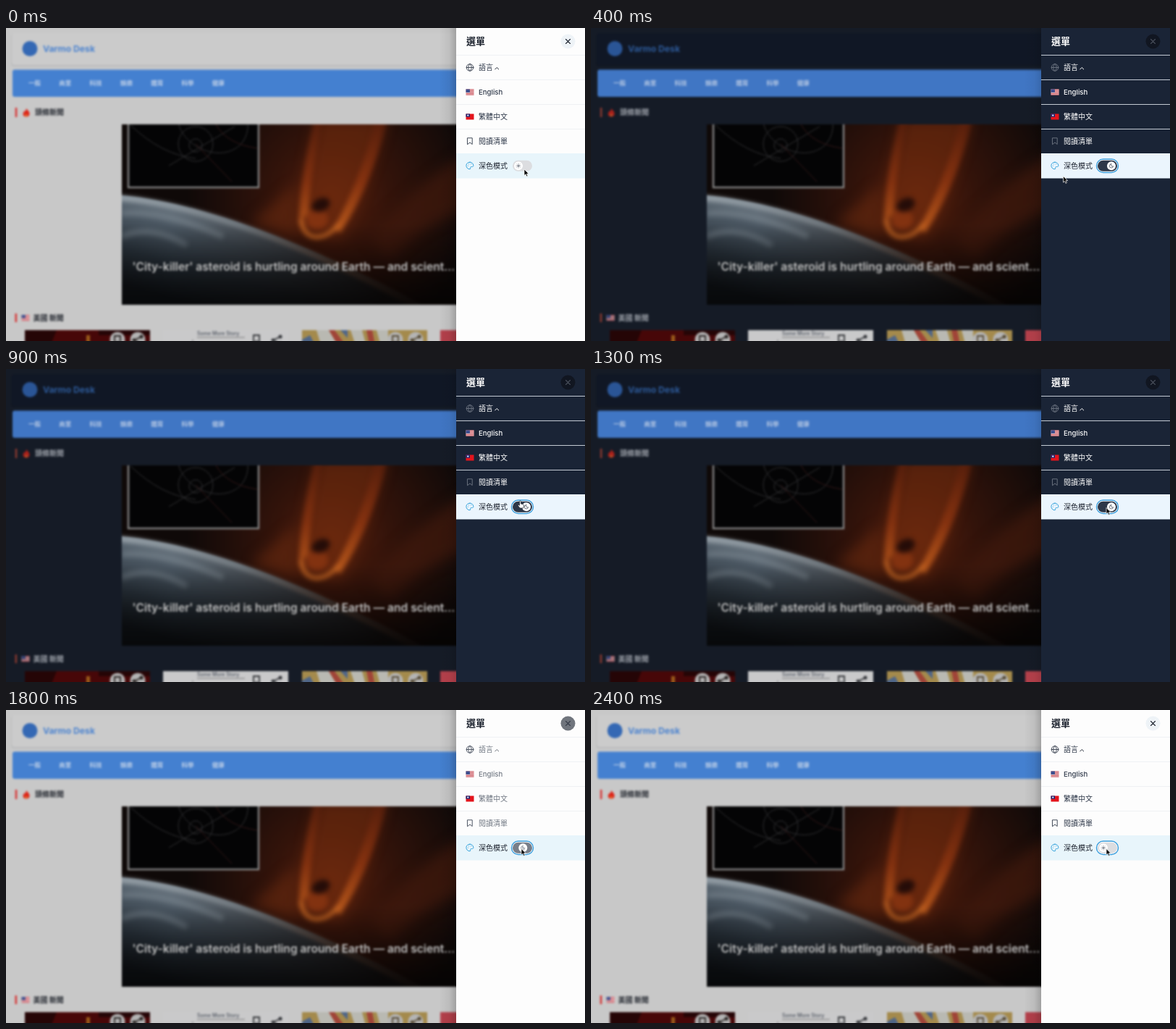
An HTML page that plays this animation: 800x432 px, repeating every 2.5 s.

```html
<!DOCTYPE html>
<html lang="zh-Hant">
<head>
<meta charset="utf-8">
<title>選單</title>
<style>
html, body { margin: 0; width: 100%; height: 100%; overflow: hidden; }
svg { display: block; width: 800px; height: 432px; }
filter { color-interpolation-filters: sRGB; }
text { font-family: Inter, "Noto Sans CJK TC", "Noto Sans CJK", "Noto Sans CJK JP", sans-serif; }
#stage {
  --body: #c8c8c8; --header: #cbcbcb; --edge: #babbbd; --nav: #4480d0; --brand: #4a82cf;
  --logo: #3468b4; --head: #22262e; --bar: #d62c2c; --navtext: #c3d2e8; --emoji: 1;
  --panel: #fdfdfd; --title: #1a202c; --line: #eff1f4; --hover: #e8f5fb; --shade: .2;
}
#stage.dark {
  --body: #151b26; --header: #101725; --edge: #111722; --nav: #4076c4; --brand: #2d5a99;
  --logo: #2a5596; --head: #a0a5ad; --bar: #8f3a30; --navtext: #b9cae4; --emoji: .75;
  --panel: #1a2436; --title: #fff; --line: #c3cad3; --hover: #ebf5fd; --shade: .12;
}
.body { fill: var(--body); }
.header { fill: var(--header); }
.edge { fill: var(--edge); }
.nav { fill: var(--nav); }
.logo { fill: var(--logo); }
.brand { fill: var(--brand); font-size: 12.2px; font-weight: 700; }
.navtext { fill: var(--navtext); font-size: 8.5px; font-weight: 700; }
.head { fill: var(--head); font-size: 10px; font-weight: 700; }
.bar { fill: var(--bar); }
.emoji { opacity: var(--emoji); }
.panel { fill: var(--panel); }
.title { fill: var(--title); font-size: 13px; font-weight: 700; }
.lines { stroke: var(--line); }
.hover { fill: var(--hover); }
.item { font-size: 10px; font-weight: 500; }
.line-icon { fill: none; stroke-width: 1; stroke-linecap: round; stroke-linejoin: round; }
</style>
</head>
<body>
<svg id="stage" viewBox="0 0 800 432">
  <defs>
    <filter id="soft" x="0" y="0" width="800" height="432" filterUnits="userSpaceOnUse"><feGaussianBlur stdDeviation="1.5"/></filter>
    <filter id="glow" x="-40%" y="-40%" width="180%" height="180%"><feGaussianBlur stdDeviation="9"/></filter>
    <filter id="haze" x="-30%" y="-30%" width="160%" height="160%"><feGaussianBlur stdDeviation="3"/></filter>
    <clipPath id="heroClip"><path d="M160 133H640V382H160Z"/></clipPath>
    <radialGradient id="sky" gradientUnits="userSpaceOnUse" cx="450" cy="235" r="200">
      <stop offset="0" stop-color="#541f0d"/><stop offset=".4" stop-color="#33130a"/><stop offset="1" stop-color="#0f0908"/>
    </radialGradient>
    <linearGradient id="flame" gradientUnits="userSpaceOnUse" x1="0" y1="133" x2="0" y2="290">
      <stop offset="0" stop-color="#5a200c"/><stop offset=".5" stop-color="#8a3410"/><stop offset="1" stop-color="#c8641f"/>
    </linearGradient>
    <linearGradient id="earth" gradientUnits="userSpaceOnUse" x1="235" y1="236" x2="200" y2="365">
      <stop offset="0" stop-color="#76828c"/><stop offset=".3" stop-color="#4a5661"/>
      <stop offset=".65" stop-color="#28313a"/><stop offset="1" stop-color="#14181d"/>
    </linearGradient>
    <linearGradient id="night" gradientUnits="userSpaceOnUse" x1="230" y1="0" x2="520" y2="0">
      <stop offset="0" stop-color="#120d0c" stop-opacity="0"/><stop offset="1" stop-color="#120d0c" stop-opacity=".92"/>
    </linearGradient>
    <linearGradient id="limb" gradientUnits="userSpaceOnUse" x1="160" y1="0" x2="580" y2="0">
      <stop offset="0" stop-color="#b4bdc3"/><stop offset=".4" stop-color="#858c91"/>
      <stop offset=".7" stop-color="#6b4a38"/><stop offset="1" stop-color="#1e100c"/>
    </linearGradient>
    <linearGradient id="fade" x2="0" y2="1">
      <stop offset="0" stop-opacity="0"/><stop offset="1" stop-opacity=".65"/>
    </linearGradient>
    <linearGradient id="shade">
      <stop offset="0" stop-opacity="0"/><stop offset=".6" stop-opacity=".3"/><stop offset="1"/>
    </linearGradient>
    <g id="us">
      <path fill="#e9e6e8" d="M0 0H11V8H0Z"/>
      <path stroke="#cf3a44" stroke-width=".9" d="M0 .5H11M0 2.3H11M0 4.1H11M0 5.9H11M0 7.6H11"/>
      <path fill="#3b4f8f" d="M0 0H5.4V4.4H0Z"/>
    </g>
    <g id="tw">
      <path fill="#e3141c" d="M0 0H11V8H0Z"/><path fill="#1d2a78" d="M0 0H5.5V4.2H0Z"/>
      <circle cx="2.75" cy="2.1" r="1.1" fill="#fff"/>
    </g>
    <g id="mark"><path d="M-4 -5H4V6L0 3-4 6Z" fill="none" stroke="currentColor" stroke-width="1.8"/></g>
    <g id="share">
      <path d="M5 -4L-5 1 5 6" fill="none" stroke="currentColor" stroke-width="1.8"/>
      <g fill="currentColor"><circle cx="5" cy="-4" r="2.5"/><circle cx="-5" cy="1" r="2.5"/><circle cx="5" cy="6" r="2.5"/></g>
    </g>
    <g id="actions">
      <g fill="#b4b4b4"><circle cx="-14" r="10.5"/><circle cx="14" r="10.5"/></g>
      <use href="#mark" x="-14"/><use href="#share" x="14"/>
    </g>
  </defs>

  <rect class="body" width="800" height="432"/>
  <g filter="url(#soft)">
    <rect class="body" x="-20" y="-20" width="840" height="472"/>
    <rect class="edge" x="7" y="8" width="640" height="45" rx="4"/>
    <rect class="header" x="8" y="7" width="640" height="44" rx="4"/>
    <circle class="logo" cx="33" cy="28.5" r="10.5"/>
    <text class="brand" x="51" y="33">Varmo Desk</text>
    <rect class="nav" x="9" y="57.5" width="640" height="37.5" rx="3"/>
    <g id="tabs" class="navtext"></g>

    <rect class="bar" x="12.8" y="110" width="2.4" height="13"/>
    <g class="emoji">
      <path fill="#dc2418" d="M28 111C30 113.500 33 116 32.500 119C32 121.500 30.500 122.500 28 122.500S24 121.500 23.500 119C23.500 117 24.800 116 25.200 114.500C26 115.500 27.500 115 28 111Z"/>
      <ellipse cx="28" cy="120.500" rx="1.500" ry="1.800" fill="#e8762c"/>
    </g>
    <text class="head" x="40" y="120">頭條新聞</text>

    <g clip-path="url(#heroClip)">
      <rect x="160" y="133" width="480" height="249" fill="url(#sky)"/>
      <g filter="url(#glow)">
        <path fill="#7c3010" opacity=".55" d="M404 280Q405 220 432 125H526Q500 215 462 290Z"/>
        <path fill="#6a2a10" opacity=".6" d="M340 268L400 215 400 290Z"/>
        <path fill="#421a0e" opacity=".7" d="M500 290Q560 220 640 170V250Q570 270 530 320Z"/>
      </g>
      <g filter="url(#haze)">
        <path fill="url(#flame)" opacity=".85" d="M405 270Q405 215 427 125H438Q420 205 418 255Z"/>
        <path fill="url(#flame)" opacity=".9" d="M452 278Q490 210 510 125H526Q506 215 462 282Z"/>
        <path fill="none" stroke="#cd6a24" stroke-width="5" stroke-linecap="round" d="M408 266C411 294 440 296 458 272"/>
        <ellipse cx="430" cy="264" rx="15" ry="14" fill="#823210"/>
        <ellipse cx="435" cy="244" rx="13" ry="9" fill="#240c08" transform="rotate(-25 435 244)"/>
      </g>
      <g id="globe">
        <path fill="url(#earth)" d="M150 230C265 238 420 296 590 392H150Z"/>
        <path fill="url(#night)" d="M150 230C265 238 420 296 590 392H150Z"/>
      </g>
      <g fill="none" filter="url(#haze)">
        <path stroke="url(#limb)" stroke-width="5" d="M150 234C265 242 418 300 590 396"/>
        <path stroke="#98a3ab" stroke-width="8" opacity=".35" d="M160 256Q220 252 300 288M160 288Q200 270 250 300"/>
      </g>
      <rect x="169" y="120" width="180" height="100" fill="#040405" stroke="#858585" stroke-width="2.4"/>
      <g fill="none" stroke="#303032" stroke-width="1">
        <circle cx="262" cy="160" r="24"/><circle cx="262" cy="162" r="9"/>
        <path d="M238 128C240 160 295 190 325 160Q336 146 334 130M172 134Q215 175 262 180M225 190L316 136"/>
        <path stroke="#351818" d="M262 160L312 212M290 133Q305 160 347 166"/>
      </g>
      <rect x="160" y="270" width="480" height="112" fill="url(#fade)"/>
      <text x="174.500" y="334.500" fill="#c4c4c4" font-size="15.600" font-weight="600">'City-killer' asteroid is hurtling around Earth — and scient...</text>
    </g>

    <rect class="bar" x="12.600" y="394" width="2.400" height="12"/>
    <use class="emoji" href="#us" x="21.500" y="396"/>
    <text class="head" x="37.500" y="403.500">美國 新聞</text>

    <rect x="26" y="417" width="173" height="30" fill="#470708"/>
    <path fill="#250506" d="M26 417H70L58 447H26ZM128 417H199V424H128Z"/>
    <path fill="#9a5a1a" d="M111 424H116V440H111Z"/>
    <use href="#actions" x="168" y="430" color="#25201f"/>
    <rect x="217" y="417" width="173" height="30" fill="#c9c9ca"/>
    <text x="264" y="424" font-size="7" font-weight="600" fill="#555b65">Some More Story</text>
    <path stroke="#777" d="M264 427H330M258 430V440"/>
    <g color="#303236"><use href="#mark" x="346" y="429"/><use href="#share" x="374" y="430"/></g>
    <rect x="409" y="417" width="173" height="30" fill="#a48a4c"/>
    <path fill="#b9b9b2" d="M429 417H446L464 447H438ZM476 417H492L500 447H486ZM512 417H528V447H520Z"/>
    <path fill="#a04438" d="M446 417H454L476 447H464ZM498 417H506L512 447H504Z"/>
    <path fill="#4f6688" d="M409 430L420 424 432 447H409ZM462 417H472V428Z"/>
    <use href="#actions" x="552" y="430" color="#51452f"/>
    <rect x="600" y="417" width="60" height="30" fill="#b5404b"/>
  </g>

  <rect x="598" width="24" height="432" fill="url(#shade)" style="opacity:var(--shade)"/>
  <rect class="panel" x="622" width="178" height="432"/>
  <text class="title" x="636" y="23">選單</text>
  <circle id="close" cx="776.500" cy="18.500" r="10"/>
  <path id="cross" class="line-icon" style="stroke-width:1.1" d="M773.500 15.500l6 6m0-6l-6 6"/>
  <path class="lines" d="M622 37.500H800M622 71.500H800M622 105.500H800M622 139.500H800"/>
  <rect class="hover" x="622" y="173" width="178" height="34.500"/>

  <g id="icons" class="line-icon">
    <circle cx="641" cy="54.500" r="4.800"/>
    <path d="M636.200 54.500H645.800M641 49.700C638 52.500 638 56.500 641 59.300C644 56.500 644 52.500 641 49.700"/>
    <path d="M637.800 151.800H644.200V160.500L641 158 637.800 160.500Z"/>
  </g>
  <use href="#us" x="635.500" y="84.500"/>
  <use href="#tw" x="635.500" y="118.500"/>
  <g id="items" class="item">
    <text x="653" y="58.300">語言</text>
    <text x="653" y="92.100" style="font-size:9.600px">English</text>
    <text x="653" y="126.300">繁體中文</text>
    <text x="653" y="160.300">閱讀清單</text>
  </g>
  <path id="caret" class="line-icon" d="M675.700 57l2.500-2.500 2.500 2.500"/>
  <g class="line-icon" stroke="#36a3dc">
    <path d="M641 185.200C633.500 185.400 634.800 195 641 194.800C642.500 194.500 641 192.800 642 191.800C643 191 645.800 192.500 645.800 189.800C645.600 187 643.500 185.200 641 185.200Z"/>
    <path d="M638.300 190.200h.01M639.600 187.800h.01M642.600 187.800h.01"/>
  </g>
  <text class="item" x="653" y="194.300" fill="#1a202c">深色模式</text>

  <rect id="ring" x="698.500" y="181" width="30" height="18.500" rx="9.250" fill="#fff" stroke="#3d9fdd" stroke-width="1.500"/>
  <rect id="track" x="700" y="182.700" width="27" height="15" rx="7.500"/>
  <g id="knob">
    <circle r="6" fill="#fff"/>
    <g id="sun" class="line-icon" stroke="#8a8f98" style="stroke-width:.8">
      <circle r="1.300" fill="#8a8f98"/>
      <path d="M0-2.600v-.4M0 2.600v.4M-2.600 0h-.4M2.600 0h.4M-1.900-1.900l-.3-.3M1.900 1.900l.3.3M-1.900 1.900l-.3.3M1.900-1.900l.3-.3"/>
    </g>
    <path id="moon" class="line-icon" stroke="#4a5260" style="stroke-width:.8" d="M-.3-2.600A2.700 2.700 0 1 0 2.600 .5A2.200 2.200 0 0 1-.3-2.600Z"/>
  </g>

  <g id="cursor">
    <path id="arrow" d="M0 0V8.600L2 6.800 3.400 9.900 4.900 9.200 3.500 6.200H6.200Z" fill="#000" stroke="#fff" stroke-width=".7"/>
    <path id="hand" d="M-.9 .4Q0-.6 .9 .4V4L3.800 4.700Q5.400 5.200 5 7L4.200 10H-.4L-3 6.600Q-3 5-1.800 5.600L-.9 6.400Z" fill="#fff" stroke="#20252e" stroke-width=".7"/>
  </g>
</svg>
<script>
const LOOP = 2500, STEP = 100, DARK_AT = 100, LIGHT_AT = 1800, HALFWAY = .57;
const $ = id => document.getElementById(id);

// time, x, y of the pointer
const path = [
  [0, 716, 195], [100, 716, 195], [400, 652.5, 204.5], [500, 652.5, 204.5],
  [900, 710.5, 182], [1000, 711, 184], [1200, 712, 191.5], [LOOP, 712, 191.5]
];

// light and dark end colours, easing power
const tones = [
  ["items", "fill", [45, 55, 72], [255, 255, 255], 2],
  ["caret", "stroke", [35, 42, 55], [255, 255, 255], 2],
  ["icons", "stroke", [66, 74, 88], [104, 112, 125], 2],
  ["close", "fill", [238, 243, 247], [17, 22, 33], 1],
  ["cross", "stroke", [32, 38, 50], [72, 78, 90], 1],
  ["track", "fill", [220, 221, 224], [45, 55, 72], 1]
];

["一般", "商業", "科技", "娛樂", "體育", "科學", "健康"].forEach((label, i) => {
  const tab = document.createElementNS("http://www.w3.org/2000/svg", "text");
  tab.textContent = label;
  tab.setAttribute("x", 31 + i * 42.3);
  tab.setAttribute("y", 79.3);
  $("tabs").append(tab);
});

const lerp = (a, b, k) => a + (b - a) * k;
const mix = (a, b, k) => `rgb(${a.map((v, i) => Math.round(lerp(v, b[i], k)))})`;

function pointer(t) {
  const i = path.findIndex(p => p[0] > t);
  const [a, b] = [path[i - 1], path[i]];
  const k = (t - a[0]) / (b[0] - a[0]);
  const s = k * k * (3 - 2 * k);
  return [lerp(a[1], b[1], s), lerp(a[2], b[2], s)];
}

function darkness(t) {
  if (t < DARK_AT) return 0;
  if (t < LIGHT_AT) return t < DARK_AT + STEP ? HALFWAY : 1;
  return t < LIGHT_AT + STEP ? HALFWAY : 0;
}

function draw(t) {
  const d = darkness(t);
  $("stage").classList.toggle("dark", t >= DARK_AT && t < LIGHT_AT);
  for (const [id, prop, light, dark, power] of tones) $(id).style[prop] = mix(light, dark, d ** power);
  $("ring").style.opacity = t >= DARK_AT ? 1 : 0;
  $("knob").setAttribute("transform", `translate(${lerp(708, 719, d)} 190.2)`);
  $("sun").style.opacity = 1 - d;
  $("moon").style.opacity = d;
  const hand = t >= 800 && t < 1200;
  $("hand").style.display = hand ? "" : "none";
  $("arrow").style.display = hand ? "none" : "";
  $("cursor").setAttribute("transform", `translate(${pointer(t)})`);
}

const start = performance.now();
function tick() {
  const t = (performance.now() - start) % LOOP;
  draw(Math.floor(t / STEP) * STEP);
  requestAnimationFrame(tick);
}
tick();
</script>
</body>
</html>
```
